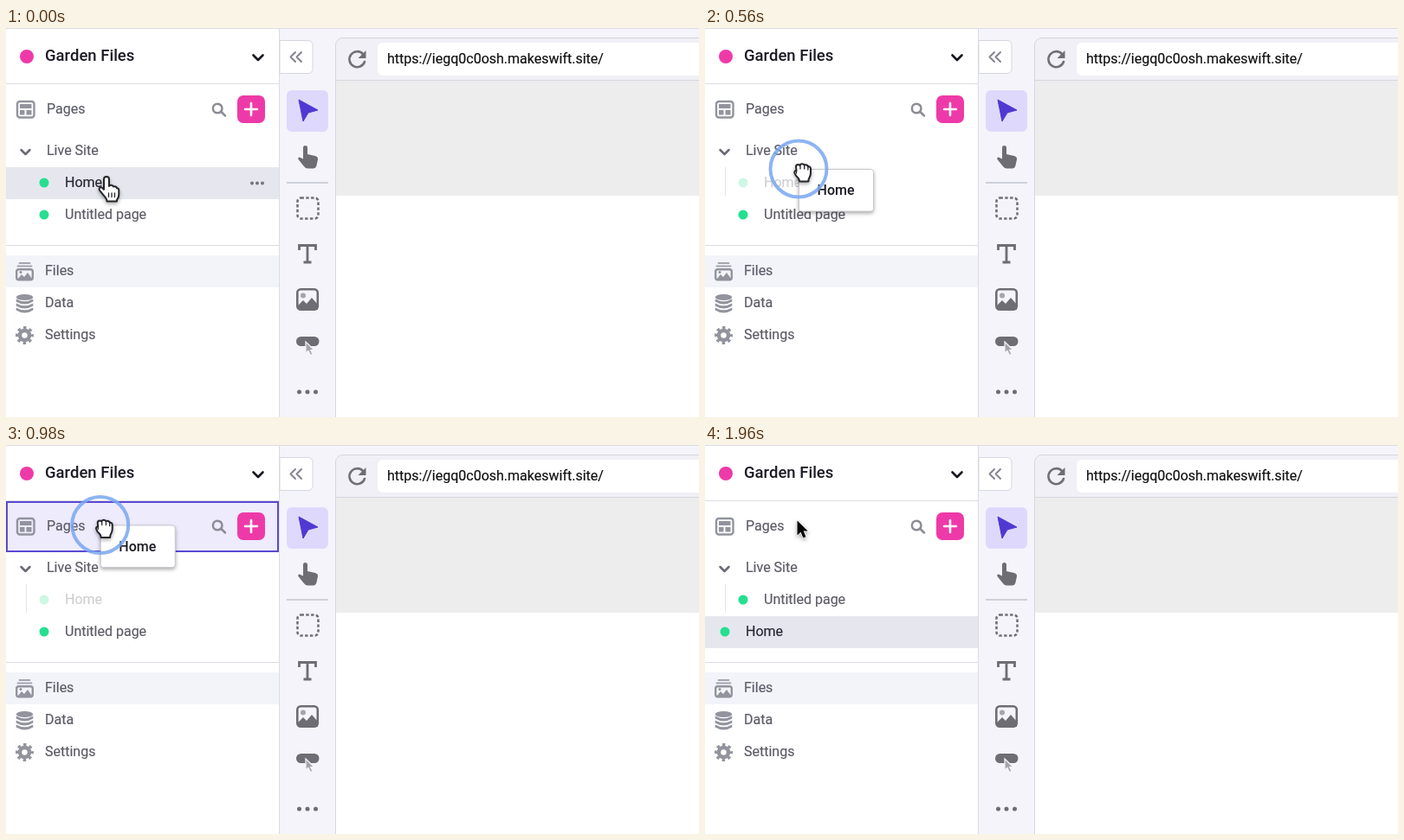
An HTML page for the animation above (2.73 s loop, 800 by 450 pixels).

```html
<!DOCTYPE html>
<html lang="en">
<head>
<meta charset="utf-8">
<style>
  html, body { margin: 0; width: 100%; height: 100%; overflow: hidden; background: #fff; }
  svg { display: block; width: 800px; height: 450px; }
  text { font: 400 16px Roboto, Arial, sans-serif; fill: #5c5c67; stroke: #5c5c67; stroke-width: .2; }
  .dark { fill: #262631; stroke: #262631; }
  .bold { font-weight: 500; fill: #1b1b24; stroke: none; }
  .line { fill: none; stroke-linecap: round; stroke-linejoin: round; }
  .gray { fill: #92939d; }
  .tool { fill: #6d6d73; }
  .hand { fill: #fff; stroke: #25252b; stroke-width: 2; stroke-linejoin: round; stroke-linecap: round; }
  .green { fill: #25df90; }
  .shadow { filter: drop-shadow(0 2px 2px #0005); }
</style>
</head>
<body>
<svg viewBox="0 0 800 450">
  <!-- window -->
  <rect width="800" height="450" fill="#f4f4fa"/>
  <path d="M381 450V20a8 8 0 0 1 8-8H800V450Z" fill="#fff"/>
  <path d="M381 61V20a8 8 0 0 1 8-8H800V61Z" fill="#f0f0f6"/>
  <rect x="381" y="61" width="419" height="133" fill="#ededed"/>
  <path class="line" d="M380.5 450V20a8.500 8.500 0 0 1 8.500-8.500H800M381 60.500H800" stroke="#d5d6df"/>
  <rect x="429" y="17" width="390" height="38" rx="6" fill="#fff"/>
  <text x="440" y="41" style="fill:#111;stroke:#111">https://iegq0c0osh.makeswift.site/</text>
  <path class="line" d="M412 30a9 9 0 1 0 2 9" stroke="#707077" stroke-width="2.600"/>
  <path class="tool" d="M415.500 26v9h-9z"/>

  <!-- sidebar -->
  <rect width="315" height="450" fill="#fff"/>
  <path d="M315.500 0V450M0 64.500H315M0 251.500H315" stroke="#dcdde4"/>
  <path d="M0 .5H800" stroke="#dcdce5"/>
  <path d="M316 14.500h33a5 5 0 0 1 5 5v28a5 5 0 0 1-5 5h-33z" fill="#fff" stroke="#d5d6df"/>
  <path class="line" d="M334 28l-5.500 5.500l5.500 5.500M341 28l-5.500 5.500l5.500 5.500" stroke="#85868f" stroke-width="2"/>
  <circle cx="24" cy="33" r="8" fill="#ee3aa8"/>
  <text class="bold" x="45" y="38" style="font-size:18.500px">Garden Files</text>
  <path class="line" d="M285.500 31.500l5.500 5.500l5.500-5.500" stroke="#15151c" stroke-width="2.600"/>

  <rect id="drop" x="1" y="66" width="313" height="57" fill="#eeebfd" stroke="#5a48d3" stroke-width="2"/>
  <rect class="line" x="13" y="85" width="19.500" height="18.500" rx="3" stroke="#92939d" stroke-width="2.400"/>
  <path class="gray" d="M16 88h13.500v5H16zM16 95h5.500v5.500H16zM23.500 95h6v5.500h-6z"/>
  <text x="47" y="99">Pages</text>
  <path class="line" d="M248.500 97l4.500 4.500M249.500 93a5.300 5.300 0 1 1-10.600 0a5.300 5.300 0 1 1 10.600 0" stroke="#8b8c95" stroke-width="2.500"/>
  <rect x="267" y="78" width="32" height="32" rx="7" fill="#ee3aa8"/>
  <path class="line" d="M276 94h14M283 87v14" stroke="#fff" stroke-width="2.600"/>

  <path class="line" d="M17.500 141l5 5l5-5" stroke="#696a73" stroke-width="2.500"/>
  <text x="47" y="147">Live Site</text>
  <path id="branch" d="M23.500 161V194" stroke="#e3e4ea"/>
  <rect id="row" width="315" height="37" fill="#e6e7ee"/>
  <g id="home">
    <circle class="green" cx="44" cy="179" r="5.500"/>
    <text class="dark" x="68" y="184">Home</text>
  </g>
  <g id="more" fill="#73747d">
    <circle cx="284" cy="179.500" r="2"/><circle cx="290" cy="179.500" r="2"/><circle cx="296" cy="179.500" r="2"/>
  </g>
  <g id="untitled">
    <circle class="green" cx="44" cy="179" r="5.500"/>
    <text x="68" y="184">Untitled page</text>
  </g>

  <rect y="263" width="315" height="37" fill="#f3f4fa"/>
  <path class="line" d="M15.500 272h12M13.500 275.500h16" stroke="#a3a4ad" stroke-width="1.800"/>
  <rect class="line" x="12.200" y="279.200" width="18.600" height="12" rx="2.500" stroke="#92939d" stroke-width="2.400"/>
  <path class="gray" d="M14 290l4-5l3 3l4-5l5 7z"/><circle class="gray" cx="17" cy="282.500" r="1.500"/>
  <text x="45" y="286">Files</text>
  <g class="gray">
    <ellipse cx="21.500" cy="311.500" rx="9.800" ry="3.500"/>
    <path id="disk" d="M11.700 313.500q9.800 5.500 19.600 0v3q-9.800 6-19.600 0z"/>
    <use href="#disk" y="5"/><use href="#disk" y="10"/>
  </g>
  <text x="45" y="323">Data</text>
  <circle class="line" cx="21.500" cy="355.500" r="5.500" stroke="#92939d" stroke-width="4.500"/>
  <circle class="line" cx="21.500" cy="355.500" r="8.700" stroke="#92939d" stroke-width="3.500" style="stroke-linecap:butt" stroke-dasharray="3.400 3.433" stroke-dashoffset="1.700"/>
  <text x="45" y="360">Settings</text>

  <!-- toolbar -->
  <rect x="324" y="72" width="48" height="48" rx="6" fill="#ded9fc"/>
  <path d="M338 83l22 12l-11 3l-6 10z" fill="#5038d2" stroke="#5038d2" stroke-linejoin="round"/>
  <path class="tool" d="M343 138.500a2.500 2.500 0 0 1 5 0V146l9 2q3.500 1 3 4l-1.500 7q-1 3.500-4 3.500h-6q-3 0-5-3l-6-7.500q-1-2.500 1.500-2.500l4 2z"/>
  <path d="M324 179H372" stroke="#cfd0d9" stroke-width="2"/>
  <rect class="line" x="336.500" y="196.500" width="24" height="24" rx="4" stroke="#6d6d73" stroke-width="2.500" style="stroke-linecap:butt" stroke-dasharray="3.400 2.400"/>
  <path d="M338.500 257V251.500H357.500V257M348 251.500V271M343.500 271h9" fill="none" stroke="#6d6d73" stroke-width="2.800"/>
  <rect class="line" x="336.300" y="302.300" width="23.500" height="23.500" rx="4" stroke="#6d6d73" stroke-width="2.600"/>
  <path class="tool" d="M337 321l6-6l4 4l6-7l7 8v6h-23z"/><circle cx="343" cy="309.500" r="3" fill="#a4a4aa"/>
  <rect class="tool" x="335" y="357" width="26.500" height="11" rx="5.500"/>
  <path d="M346 363v13l3-2.500l2.500 5l2.500-1.200l-2.300-4.800h4z" fill="#a4a4aa" stroke="#f4f4fa" stroke-width="1.200"/>
  <g class="tool"><circle cx="338.500" cy="421" r="2.500"/><circle cx="348" cy="421" r="2.500"/><circle cx="357.500" cy="421" r="2.500"/></g>

  <!-- pointer and dragged label, drawn around the hot spot -->
  <g id="pointer">
    <g id="label">
      <rect class="shadow" x=".5" y=".5" width="86" height="48.500" rx="3" fill="#fff" stroke="#c9c9cf"/>
      <text class="bold" x="21.500" y="30">Home</text>
    </g>
    <circle id="ring" fill="none" stroke="#7aa7f0"/>
    <g id="point" class="hand shadow" transform="translate(-8 0)">
      <path d="M7 4a3 3 0 0 1 6 0v8q1-1.700 3-1.100q1.800.3 2 1.600q1-.7 2.500 0q1.300.6 1.500 1.900q2-.4 2.300 2v5q0 3-1.500 5q-1 1.500-.8 3H10.500q0-2-1.500-4l-6.500-8q-2-2.700 0-3.800q2-1 4.500 2.200z"/>
      <path d="M12.500 20v4.500M16 20v4.500M19.500 20v4.500" stroke-width="1.300"/>
    </g>
    <g id="grab" class="hand shadow" transform="translate(-7 -8)">
      <path d="M4.500 10L4 5.500q0-2.500 2.500-2.500q1.500 0 2 1q.8-2 2.800-1.800q2 .2 2.400 1.600q1-.9 2.600-.3q1.500.6 1.600 1.900q2.800-.5 3.100 2.400v5q0 3-1.600 5.500q-1 1.500-1 4.200H8q0-2.200-1.500-4q-3-2.500-4-5.500q-.8-3 2-3z"/>
      <path d="M4.500 10v3M9 4.500v3.500M13.700 4.500v3.500M17.900 6v3" stroke-width="1.300"/>
    </g>
    <path id="arrow" class="shadow" transform="translate(-1.500 -.5)" d="M0 0v17l4-3.800l2.800 6.800l3.200-1.300l-2.800-6.700h5z" fill="#050505" stroke="#fff" stroke-width="1.600" paint-order="stroke"/>
  </g>
</svg>
<script>
const LOOP = 2730, STEP = 70, DRAG = 560, OVER = 770, RELEASE = 1540;
const $ = id => document.getElementById(id);
const show = (id, on) => $(id).style.display = on ? "" : "none";

// time, x, y of the pointer's hot spot
const path = [
  [0, 114, 171], [210, 114, 171], [420, 109.5, 175.5], [490, 109, 173], [560, 108, 163],
  [700, 108, 134], [840, 109, 103], [910, 109, 95], [1050, 108.5, 90], [1260, 108, 88], [LOOP, 108, 88]
];

function hotSpot(t) {
  const i = path.findIndex(p => p[0] > t);
  const [a, b] = [path[i - 1], path[i]];
  const k = (t - a[0]) / (b[0] - a[0]);
  return [a[1] + (b[1] - a[1]) * k, a[2] + (b[2] - a[2]) * k];
}

function draw(t) {
  const moved = t >= RELEASE, dragging = t >= DRAG && !moved;
  $("pointer").setAttribute("transform", `translate(${hotSpot(t)})`);
  show("label", dragging);
  show("grab", dragging);
  show("point", t < DRAG);
  show("arrow", moved);
  show("drop", dragging && t >= OVER);
  show("branch", t >= DRAG);
  show("row", !dragging);
  show("more", t < DRAG);
  $("row").setAttribute("y", moved ? 198 : 161);
  $("home").setAttribute("opacity", dragging ? .22 : 1);
  $("home").setAttribute("transform", moved ? "translate(-21 37)" : "");
  $("untitled").setAttribute("transform", moved ? "" : "translate(0 37)");

  // the ring fades in on press, then widens and thins out on release
  const out = moved ? (t - RELEASE + STEP) / 350 : 0;
  const ring = $("ring");
  ring.setAttribute("r", 32.5 + 18 * out);
  ring.setAttribute("stroke-width", Math.max(0, 4 - 4 * out));
  ring.setAttribute("opacity", .85 * Math.min(1, Math.max(0, (t - 280) / 140)) * Math.max(0, 1 - out * out));
}

function tick() {
  const t = performance.now() % LOOP;
  draw(Math.floor(t / STEP) * STEP);
  requestAnimationFrame(tick);
}
tick();
</script>
</body>
</html>
```
